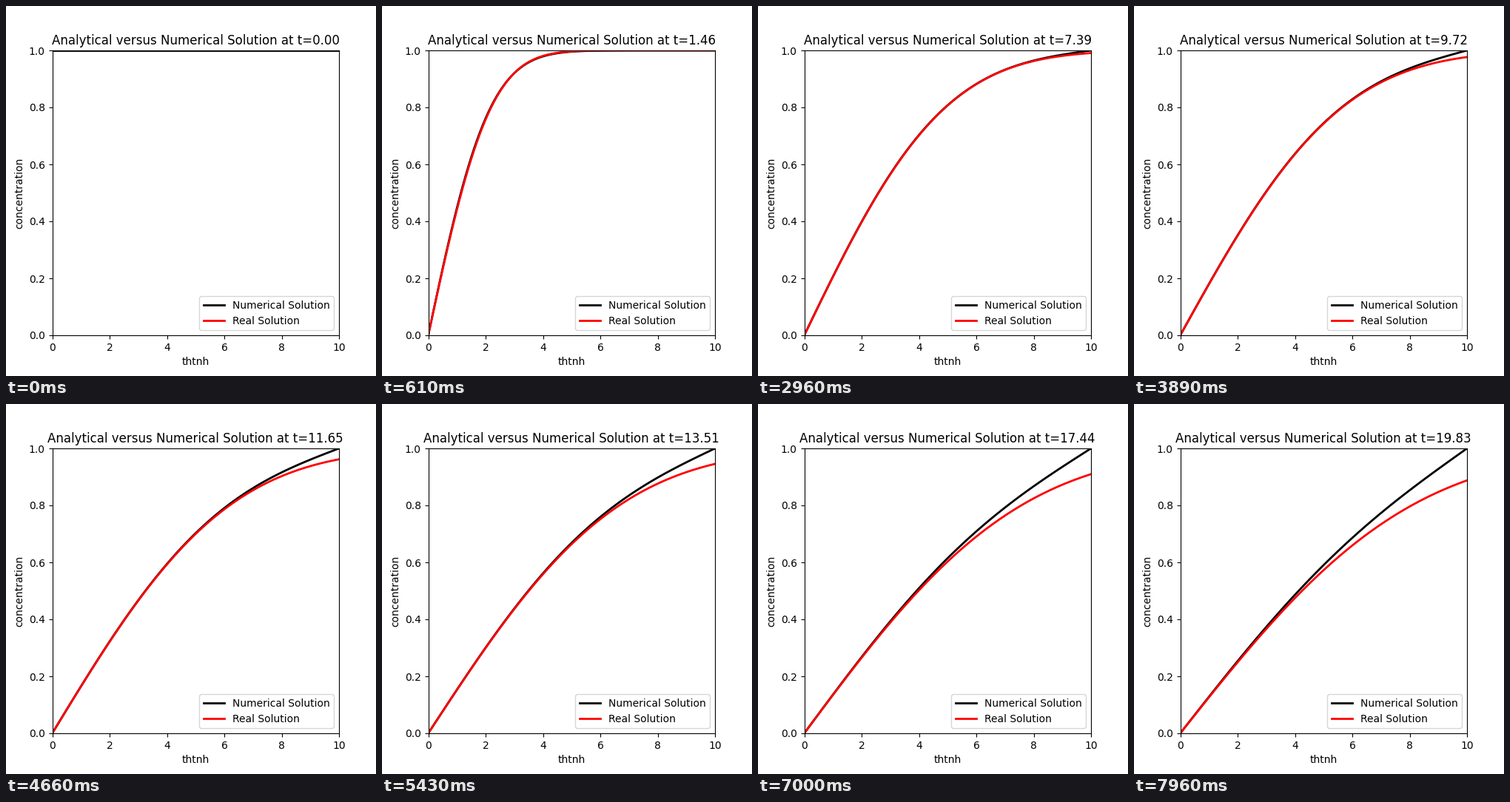
Write a matplotlib script that moves like this. It is 500x500 px and loops after 7.99 s.

```python
import math

import numpy as np
import matplotlib.pyplot as plt
from matplotlib.animation import FuncAnimation

FRAMES = 300
LOOP_MS = 7990
LENGTH = 10.0
POINTS = 101
DT = 0.06655

x = np.linspace(0, LENGTH, POINTS)


def implicit_diffusion():
    """Backward Euler history with u(0)=0 and u(L)=1, starting from u=1."""
    r = DT / (x[1] - x[0]) ** 2
    system = np.eye(POINTS)
    for k in range(1, POINTS - 1):
        system[k, k - 1:k + 2] = -r, 1 + 2 * r, -r
    step = np.linalg.inv(system)
    history = [np.ones(POINTS)]
    for _ in range(FRAMES - 1):
        u = history[-1].copy()
        u[0], u[-1] = 0, 1
        history.append(step @ u)
    return history


def analytical(t):
    if t == 0:
        return np.full(POINTS, np.nan)
    return np.array([math.erf(v / (2 * math.sqrt(t))) for v in x])


numerical = implicit_diffusion()

fig, ax = plt.subplots(figsize=(5, 5), dpi=100)
ax.set_xlim(0, LENGTH)
ax.set_ylim(0, 1)
ax.set_xlabel("thtnh")
ax.set_ylabel("concentration")
title = ax.set_title("")
num_line, = ax.plot([], [], color="black", lw=2, label="Numerical Solution")
real_line, = ax.plot([], [], color="red", lw=2, label="Real Solution")
ax.legend(loc="lower right")


def update(i):
    t = i * DT
    num_line.set_data(x, numerical[i])
    real_line.set_data(x, analytical(t))
    title.set_text(f"Analytical versus Numerical Solution at t={t:.2f}")
    return num_line, real_line, title


anim = FuncAnimation(fig, update, frames=FRAMES, interval=LOOP_MS / FRAMES,
                     repeat=True, repeat_delay=0, blit=False)
plt.show()
```
